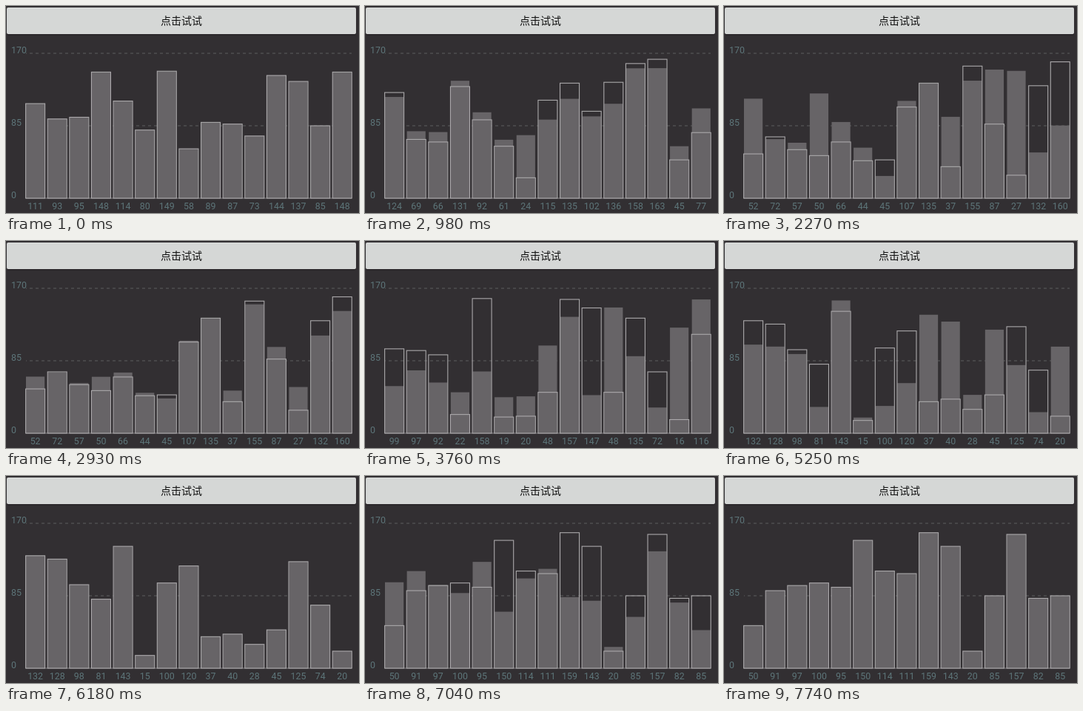
Animation, 477 px wide and 280 px high, one loop 8430 ms. Source, as an HTML page:

```html
<!DOCTYPE html>
<html lang="zh">
<head>
<meta charset="utf-8">
<title>Bar chart</title>
<style>
  html, body { margin: 0; width: 100%; height: 100%; overflow: hidden; background: #322f32; }
  svg { display: block; }
  text { font: 12.4px Roboto, sans-serif; fill: #5d7579; }
  .button { fill: #d5d7d6; }
  .shadow { fill: #272427; }
  .caption { font: 500 14px "Noto Sans CJK SC", "Noto Sans CJK", sans-serif; fill: #111; text-anchor: middle; }
  .grid { stroke: #5c5e5f; stroke-width: 1.1; stroke-dasharray: 4 4; stroke-dashoffset: 3; }
  .axis { stroke: #878587; }
  .fill { fill: #676467; }
  .frame { fill: none; stroke: #aba9ab; stroke-width: 1.1; }
  .value { text-anchor: middle; }
</style>
</head>
<body>
<svg id="stage" width="477" height="280" viewBox="0 0 477 280">
  <rect class="shadow" x="1" y="3" width="472" height="36.5" rx="2"/>
  <rect class="button" x="1" y="2" width="472" height="36" rx="2"/>
  <text class="caption" x="237" y="24.6">点击试试</text>
</svg>
<script>
const LOOP = 8430, BASE = 260, MAX = 170, SCALE = 196 / MAX;
const LEFT = 26.6, PITCH = 29.62, WIDTH = 26;
const STEP = 132, GAIN = 0.14;

// The readings printed under the bars, one row per click.
const rows = [
  [111, 93, 95, 148, 114, 80, 149, 58, 89, 87, 73, 144, 137, 85, 148],
  [124, 69, 66, 131, 92, 61, 24, 115, 135, 102, 136, 158, 163, 45, 77],
  [52, 72, 57, 50, 66, 44, 45, 107, 135, 37, 155, 87, 27, 132, 160],
  [99, 97, 92, 22, 158, 19, 20, 48, 157, 147, 48, 135, 72, 16, 116],
  [132, 128, 98, 81, 143, 15, 100, 120, 37, 40, 28, 45, 125, 74, 20],
  [50, 91, 97, 100, 95, 150, 114, 111, 159, 143, 20, 85, 157, 82, 85]
];

// Click n shows row n; growth is already under way by `lead`.
const clickAt = n => n > 1 ? 2270 + 1490 * (n - 2) : 430;
const lead = [0, 0.04, 0.1, 0.07, 0.15, 0.1];

const stage = document.getElementById("stage");
const topOf = value => BASE - value * SCALE;

function set(el, attrs) {
  for (const key in attrs) el.setAttribute(key, attrs[key]);
}

function add(tag, attrs, text = "") {
  const el = document.createElementNS("http://www.w3.org/2000/svg", tag);
  set(el, attrs);
  el.textContent = text;
  return stage.appendChild(el);
}

for (const value of [MAX, MAX / 2, 0]) {
  const y = topOf(value);
  add("path", { class: value ? "grid" : "axis", d: `M27 ${y}H467` });
  add("text", { x: 7, y: y - 0.3 }, value);
}

const bars = rows[0].map((_, i) => {
  const x = LEFT + PITCH * i;
  return {
    fill: add("rect", { class: "fill", x: x + 0.4, width: WIDTH - 0.8 }),
    frame: add("rect", { class: "frame", x, width: WIDTH }),
    label: add("text", { class: "value", x: x + WIDTH / 2, y: 275 })
  };
});

function draw(time) {
  let n = rows.length - 1;
  while (n && clickAt(n) > time) n--;
  const goal = rows[n], old = rows[Math.max(0, n - 1)];
  const steps = Math.floor((time - clickAt(n)) / STEP);
  const p = n ? Math.min(1, lead[n] + GAIN * steps) : 1;
  bars.forEach(({ fill, frame, label }, i) => {
    const y = topOf(old[i] + (goal[i] - old[i]) * p);
    const edge = topOf(goal[i]);
    set(fill, { y, height: BASE - y });
    set(frame, { y: edge, height: BASE - edge });
    label.textContent = goal[i];
  });
}

const start = performance.now();
function tick() {
  draw((performance.now() - start) % LOOP);
  requestAnimationFrame(tick);
}
tick();
</script>
</body>
</html>
```
